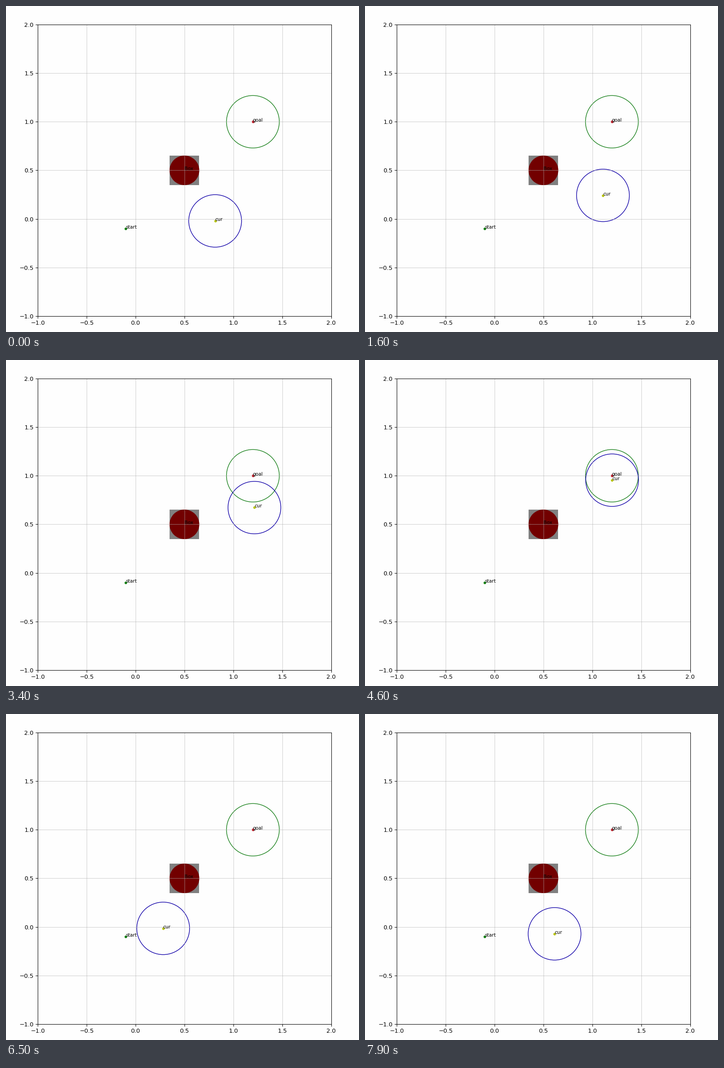
A matplotlib script that plays this animation: 779x719 px, repeating every 8000 ms.

```python
import numpy as np
import matplotlib.pyplot as plt
from matplotlib.animation import FuncAnimation
from matplotlib.patches import Circle, Rectangle

WIDTH, HEIGHT, DPI = 779, 719, 100
LEFT, TOP, AXES_WIDTH, AXES_HEIGHT = 70, 41, 647.5, 642.9
FRAMES, INTERVAL = 80, 100
PAUSE, RESTART = 8, 46          # one held frame, then a new run begins
ROBOT_RADIUS = 0.27
BACKGROUND = "#fefefe"

START = np.array([-0.1, -0.1])
MIDWAY = np.array([0.814, -0.0205])
GOAL = np.array([1.2, 1.0])
BOX = np.array([0.5, 0.5])
PUSH, REACH = 0.97, 0.73        # strength and range of the box's repulsion
CONTACT, MAX_INWARD = 0.59, 0.3


def heading(position):
    """Unit direction: pulled to the goal, pushed off the box, sliding near it."""
    offset = position - BOX
    distance = np.hypot(*offset)
    away = offset / distance
    around = np.array([-away[1], away[0]])
    force = (GOAL - position
             + PUSH * max(0, 1 / distance - 1 / REACH) / distance ** 2 * away)
    if distance < CONTACT:
        side = force @ around
        force = side * around + max(force @ away, -MAX_INWARD * side) * away
    return force / np.hypot(*force)


def drive(start, steps, speed, gain=0):
    """Walk the field; gain adds speed in proportion to the way left."""
    path = [start]
    for _ in range(steps):
        here = path[-1]
        stride = speed + gain * np.hypot(*(GOAL - here))
        path.append(here + stride * heading(here))
    return path


finish_run = drive(MIDWAY, RESTART - 1, 0.0227, 0.0042)
new_run = drive(START, FRAMES - RESTART, 0.0243)


def robot_position(frame):
    if frame > RESTART:
        return new_run[frame - RESTART]
    return finish_run[frame - (frame >= PAUSE)]


plt.rcParams.update({
    "font.family": "DejaVu Sans", "font.size": 9.4, "axes.linewidth": 0.75,
    "xtick.major.size": 3.3, "ytick.major.size": 3.3,
    "xtick.major.pad": 3.3, "ytick.major.pad": 3.3,
    "xtick.major.width": 0.75, "ytick.major.width": 0.75,
})

fig = plt.figure(figsize=(WIDTH / DPI, HEIGHT / DPI), dpi=DPI, facecolor=BACKGROUND)
ax = fig.add_axes([LEFT / WIDTH, 1 - (TOP + AXES_HEIGHT) / HEIGHT,
                   AXES_WIDTH / WIDTH, AXES_HEIGHT / HEIGHT], facecolor=BACKGROUND)
ticks = np.arange(-1, 2.1, 0.5)
ax.set(xlim=(-1, 2), ylim=(-1, 2), xticks=ticks, yticks=ticks)
ax.grid(color="#b0b0b0", alpha=0.6, linewidth=0.75)


def label(point, text):
    return ax.text(*point, text, fontsize=7.5, color="black")


def dot(point, color):
    return ax.scatter(*point, s=17, color=color, linewidths=0)


def ring(point, color):
    return ax.add_patch(Circle(point, ROBOT_RADIUS, fill=False,
                               edgecolor=color, linewidth=1))


ax.add_patch(Rectangle(BOX - 0.15, 0.3, 0.3, facecolor="#808080", linewidth=0))
ax.add_patch(Circle(BOX, 0.152, facecolor="#720000", linewidth=0))
label(BOX, "Box")

dot(START, "#108010")
label(START, "start")
ring(GOAL, "#18801a")
dot(GOAL, "#c00010")
label(GOAL, "goal")

robot_ring = ring(MIDWAY, "#1000a8")
robot_dot = dot(MIDWAY, "#b8c410")
robot_label = label(MIDWAY, "cur")


def update(frame):
    position = robot_position(frame)
    robot_ring.center = tuple(position)
    robot_dot.set_offsets([position])
    robot_label.set_position(position)
    return robot_ring, robot_dot, robot_label


animation = FuncAnimation(fig, update, frames=FRAMES, interval=INTERVAL,
                          repeat=True, repeat_delay=0, blit=False)
plt.show()
```
